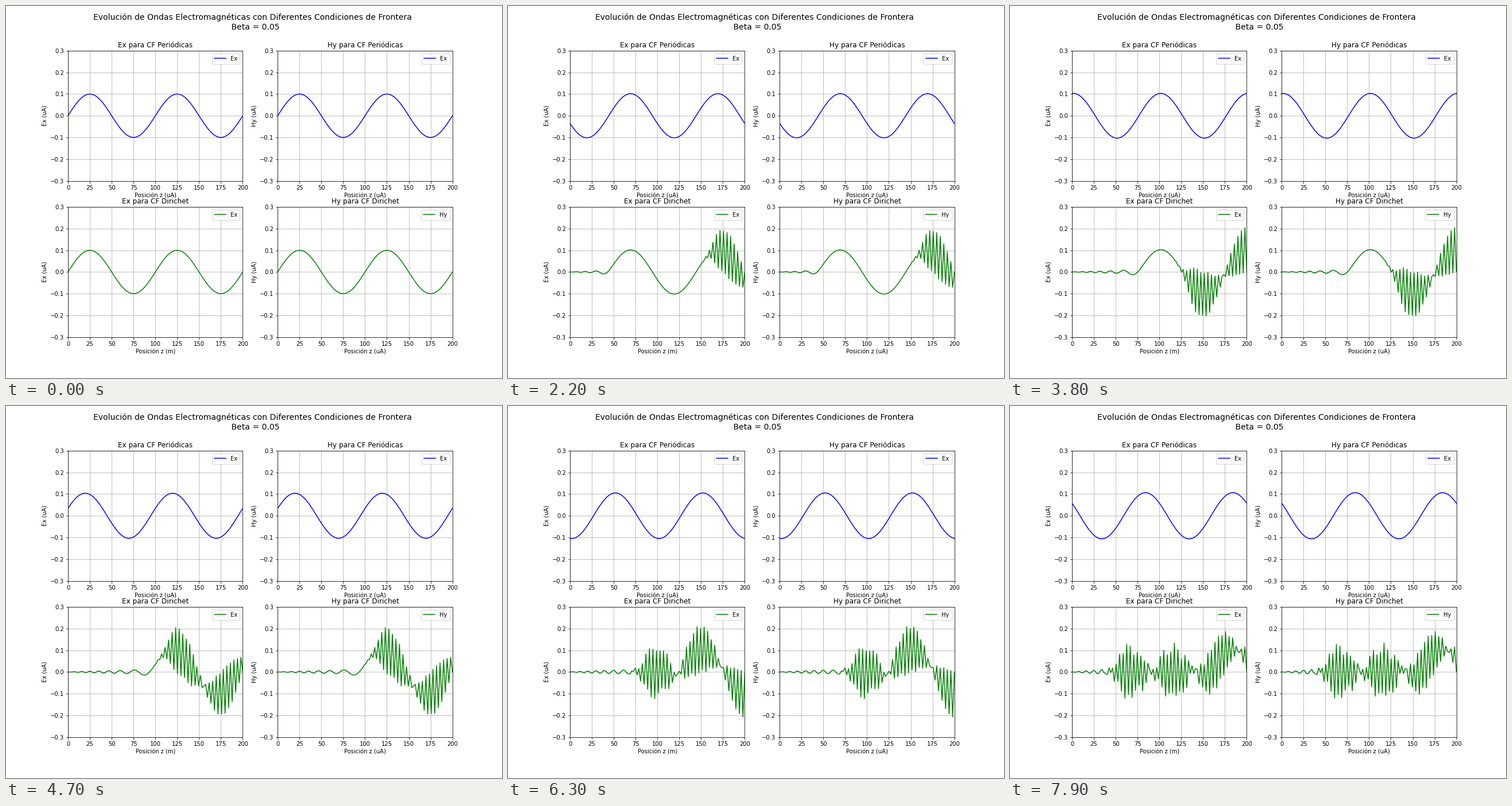
Animation of 864x648 px, one loop 8000 ms. Source, as a matplotlib script:

```python
import numpy as np
import matplotlib.pyplot as plt
from matplotlib.animation import FuncAnimation

FRAMES, STEPS = 80, 10
BETA = 0.05
N, LENGTH = 100, 200

z = np.linspace(0, LENGTH, N)
start = 0.1 * np.sin(2 * np.pi * z / 100)


def step_periodic(e, h):
    """Forward Euler step; first and last node are the same point."""
    def diff(f):
        d = np.roll(f[:-1], -1) - np.roll(f[:-1], 1)
        return np.append(d, d[0])
    return e - BETA * diff(h), h - BETA * diff(e)


def step_dirichlet(e, h):
    """Forward Euler step with both ends held at zero."""
    def diff(f):
        return f[2:] - f[:-2]
    e_new, h_new = np.zeros(N), np.zeros(N)
    e_new[1:-1] = e[1:-1] - BETA * diff(h)
    h_new[1:-1] = h[1:-1] - BETA * diff(e)
    return e_new, h_new


def evolve(step):
    e, h = start.copy(), start.copy()
    history = []
    for _ in range(FRAMES):
        history.append((e, h))
        for _ in range(STEPS):
            e, h = step(e, h)
    return history


periodic = evolve(step_periodic)
dirichlet = evolve(step_dirichlet)

fig, axes = plt.subplots(2, 2, figsize=(12, 9), dpi=72)
fig.suptitle("Evolución de Ondas Electromagnéticas con Diferentes "
             f"Condiciones de Frontera \n Beta = {BETA}", fontsize=14)


def panel(ax, field, condition, color, label, unit="uA"):
    line, = ax.plot(z, start, color=color, label=label)
    ax.set(title=f"{field} para CF {condition}",
           xlabel=f"Posición z ({unit})", ylabel=f"{field} (uA)",
           xlim=(0, LENGTH), ylim=(-0.3, 0.3))
    ax.set_xticks(range(0, LENGTH + 1, 25))
    ax.grid(True)
    ax.legend(loc="upper right")
    return line


lines = [
    panel(axes[0, 0], "Ex", "Periódicas", "blue", "Ex"),
    panel(axes[0, 1], "Hy", "Periódicas", "blue", "Ex"),
    panel(axes[1, 0], "Ex", "Dirichet", "green", "Ex", unit="m"),
    panel(axes[1, 1], "Hy", "Dirichet", "green", "Hy"),
]


def update(i):
    for line, field in zip(lines, periodic[i] + dirichlet[i]):
        line.set_ydata(field)
    return lines


anim = FuncAnimation(fig, update, frames=FRAMES, interval=100, repeat=True)
plt.show()
```
